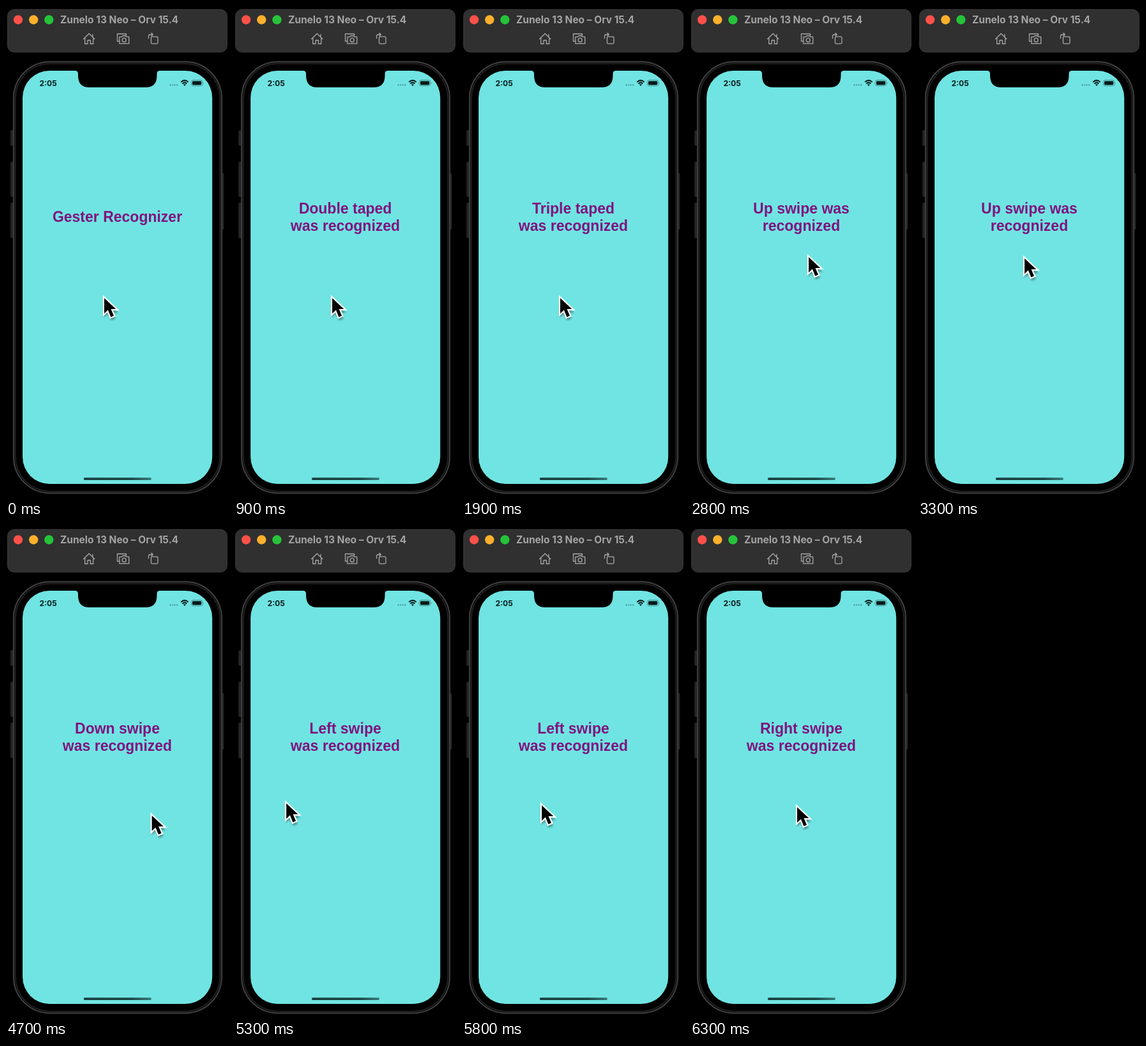
An HTML page for the animation above (6400 ms loop, 348x768 px).

```html
<!DOCTYPE html>
<html lang="en">
<head>
<meta charset="utf-8">
<title>Gesture demo</title>
<style>
  html, body { margin: 0; width: 100%; height: 100%; overflow: hidden; background: #000; }
  svg { display: block; width: 100vw; height: 100vh; }
  .ui { font-family: Inter, "Open Sans", sans-serif; }
  .label { font: 700 23px "Liberation Sans", Arial, sans-serif; fill: #80137f; text-anchor: middle; }
  .icon { fill: none; stroke: #a9a9a9; stroke-width: 1.3; stroke-linecap: round; stroke-linejoin: round; }
</style>
</head>
<body>
<svg viewBox="0 0 348 768">
  <defs>
    <linearGradient id="bar" x1="0" x2="1">
      <stop offset="0" stop-color="#173f3f"/>
      <stop offset=".7" stop-color="#1b4646"/>
      <stop offset="1" stop-color="#387a79"/>
    </linearGradient>
    <filter id="soft" x="-50%" y="-50%" width="200%" height="200%">
      <feGaussianBlur stdDeviation="1.6"/>
    </filter>
  </defs>
  <rect width="348" height="768" fill="#000"/>

  <!-- window bar -->
  <rect x="2.5" y="5.5" width="344" height="66.500" rx="10" fill="#303030" stroke="#3b3b3b"/>
  <circle cx="19" cy="21.500" r="7.200" fill="#fe5049"/>
  <circle cx="43.200" cy="21.500" r="7.200" fill="#fdb02b"/>
  <circle cx="67.300" cy="21.500" r="7.200" fill="#26c33a"/>
  <text class="ui" x="85" y="27" font-size="15.500" font-weight="700" fill="#a4a4a4">Zunelo 13 Neo – Orv 15.4</text>
  <g class="icon">
    <path d="M121.500 51.500L130.200 43L138.800 51.500M123.700 50V59H128V53.500H132.400V59H136.700V50M135.800 48V44.500"/>
    <path d="M177 55H174.500V43.500H188.500V46"/>
    <path d="M177.800 48.200H181.500L183 46.500H187.500L189 48.200H192.700V58.700H177.800Z"/>
    <circle cx="185.200" cy="53.200" r="3"/>
    <rect x="227.500" y="47.800" width="10.500" height="11" rx="1.500"/>
    <path d="M223.500 50.500V47.500Q223.500 44.500 226.500 44.500H230M228 42.300L230.300 44.500L228 46.700"/>
  </g>

  <!-- handset -->
  <g fill="#242424">
    <rect x="7" y="194" width="5" height="24" rx="1.500"/>
    <rect x="7" y="243" width="5" height="55" rx="1.500"/>
    <rect x="7" y="307" width="5" height="55" rx="1.500"/>
    <rect x="337" y="261" width="4.500" height="88" rx="1.500"/>
  </g>
  <rect x="11.700" y="87" width="326.600" height="673.500" rx="57" fill="#161616" stroke="#4b4b4b" stroke-width="1.500"/>
  <rect x="15" y="90.300" width="320" height="667" rx="54" fill="#000" stroke="#292929"/>
  <rect x="26" y="101" width="297.300" height="645" rx="42" fill="#70e4e2"/>
  <path d="M108 100.500V101Q113 101 113 106V109Q113 127 131 127H218.500Q236.500 127 236.500 109V106Q236.500 101 241.500 101V100.500Z" fill="#000"/>

  <!-- status line -->
  <text class="ui" x="52.500" y="125" font-size="12" font-weight="700" fill="#06191a">2:05</text>
  <g fill="#4da3a3">
    <circle cx="257.700" cy="123.300" r="1.200"/><circle cx="261.200" cy="123.300" r="1.200"/>
    <circle cx="264.700" cy="123.300" r="1.200"/><circle cx="268.200" cy="123.300" r="1.200"/>
  </g>
  <g fill="none" stroke="#06191a" stroke-width="2">
    <path d="M274.300 118.800Q280 113.500 285.700 118.800M276.500 121.200Q280 118.100 283.500 121.200"/>
    <path d="M280 125L278 122.800Q280 121.300 282 122.800Z" fill="#06191a" stroke="none"/>
  </g>
  <rect x="290.500" y="115.700" width="17.300" height="9" rx="2.600" fill="none" stroke="#479292"/>
  <rect x="292" y="117.200" width="14.300" height="6" rx="1.400" fill="#06191a"/>
  <path d="M309 118.700Q310.700 120.200 309 121.700Z" fill="#479292"/>
  <rect x="121.700" y="736.300" width="106.300" height="3.600" rx="1.800" fill="url(#bar)"/>

  <text class="label" id="line1" x="174.500"></text>
  <text class="label" id="line2" x="174.500" y="350.500"></text>

  <g id="cursor">
    <path d="M1 3V33L8 28L13 38L20 35L16 26H24Z" transform="translate(0 2)" opacity=".35" filter="url(#soft)"/>
    <path d="M2 5V29L7.800 23.600L12.300 34.400L17 32.400L12.500 22H20.300Z" fill="#000" stroke="#fff" stroke-width="4.400" paint-order="stroke"/>
  </g>
</svg>
<script>
  const LOOP = 6400, STEP = 100;

  // [start, first line, second line]
  const labels = [
    [0, "Gester Recognizer", ""],
    [100, "Single taped", "was recognized"],
    [900, "Double taped", "was recognized"],
    [1600, "Triple taped", "was recognized"],
    [2800, "Up swipe was", "recognized"],
    [3900, "Down swipe", "was recognized"],
    [5200, "Left swipe", "was recognized"],
    [5900, "Right swipe", "was recognized"]
  ];

  // [start, end, x, y]: each move ends at x, y
  const home = [152, 451];
  const moves = [
    [2200, 2500, 167, 547],
    [2600, 2800, 184, 387],
    [2900, 3300, 165, 389],
    [3300, 3500, 163, 389],
    [3700, 4100, 160, 586],
    [4200, 4800, 232, 436],
    [5000, 5300, 80, 428],
    [5600, 6000, 166, 434]
  ];

  const el = id => document.getElementById(id);
  const line1 = el("line1"), line2 = el("line2"), cursor = el("cursor");
  const ease = p => p * p * (3 - 2 * p);

  function cursorAt(t) {
    let [x, y] = home;
    for (const [start, end, toX, toY] of moves) {
      if (t <= start) break;
      const p = ease(Math.min(1, (t - start) / (end - start)));
      x += (toX - x) * p;
      y += (toY - y) * p;
    }
    return [x, y];
  }

  function draw(time) {
    const t = Math.floor((time % LOOP) / STEP) * STEP;
    const [, first, second] = labels.filter(l => l[0] <= t).pop();
    line1.textContent = first;
    line2.textContent = second;
    line1.setAttribute("y", second ? 323.5 : 337);
    cursor.setAttribute("transform", `translate(${cursorAt(t)})`);
  }

  const begin = performance.now();
  function tick() {
    draw(performance.now() - begin);
    requestAnimationFrame(tick);
  }
  tick();
</script>
</body>
</html>
```
